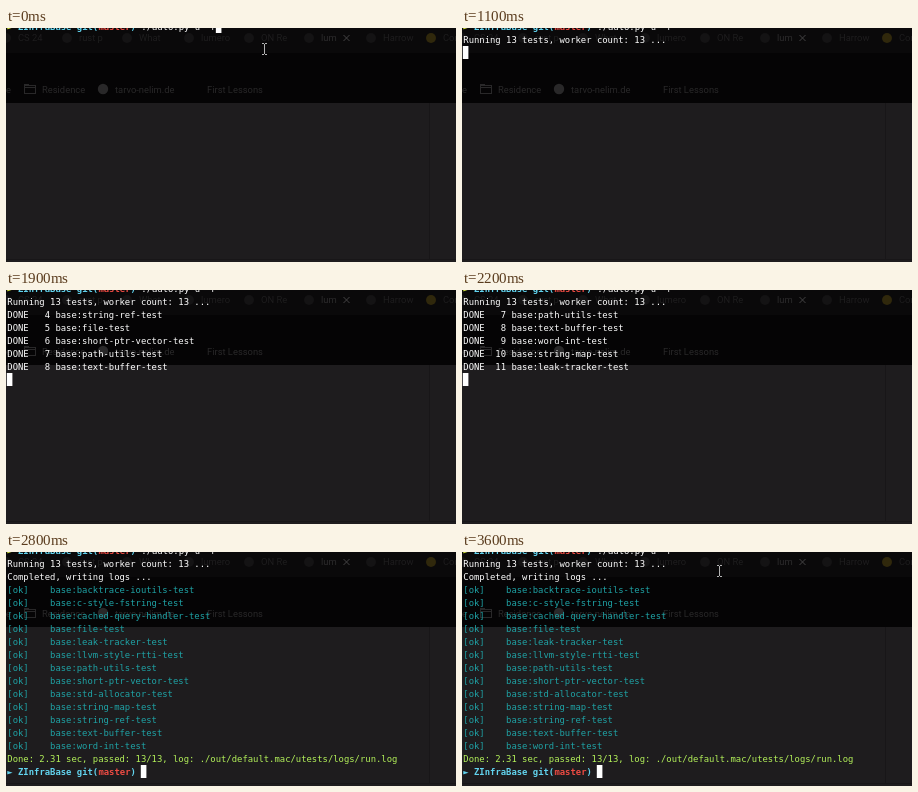
An HTML page with a canvas that plays this animation: 450x234 px, repeating every 3700 ms.

```html
<!DOCTYPE html>
<html lang="en">
<head>
<meta charset="utf-8">
<title>Terminal test run</title>
<style>
html, body { margin: 0; width: 100%; height: 100%; overflow: hidden; background: #1e1c1e; }
canvas { display: block; width: 450px; height: 234px; }
</style>
</head>
<body>
<canvas id="stage" width="450" height="234"></canvas>
<script>
const ctx = document.getElementById('stage').getContext('2d');
const LOOP = 3700, LEFT = 1.3, COL = 5.36, ROW = 12.95;
const WHITE = '#fff', TEAL = '#1fa3a6', LIME = '#b4f25a', CYAN = '#62d3ee', RED = '#ee4b43';

const tests = ['llvm-style-rtti', 'c-style-fstring', 'cached-query-handler', 'string-ref',
  'file', 'short-ptr-vector', 'path-utils', 'text-buffer', 'word-int', 'string-map',
  'leak-tracker', 'std-allocator', 'backtrace-ioutils'].map(name => `base:${name}-test`);
const sorted = [...tests].sort();

// [time in ms, number of finished tests]
const progress = [[1400, 2], [1500, 3], [1600, 4], [1700, 5], [1800, 6],
  [1900, 8], [2200, 11], [2400, 12], [2500, 13]];
const ENTER = 100, START = 400, FINISH = 2800, POINTER_BACK = 3400;

function rect(x, y, w, h, color) {
  ctx.fillStyle = color;
  ctx.fillRect(x, y, w, h);
}

function dot(x, y, r, color) {
  ctx.fillStyle = color;
  ctx.beginPath();
  ctx.arc(x, y, r, 0, Math.PI * 2);
  ctx.fill();
}

function label(text, x, y, color) {
  ctx.font = '9.4px Roboto, sans-serif';
  ctx.fillStyle = color;
  ctx.fillText(text, x, y);
}

function print(row, col, text, color = WHITE, weight = 'normal') {
  ctx.font = `${weight} 8.9px "DejaVu Sans Mono", monospace`;
  ctx.fillStyle = color;
  ctx.fillText(text, LEFT + col * COL, 2.4 + row * ROW);
}

function caret(row, col) {
  rect(0.8 + col * COL, Math.round(-7.6 + row * ROW), 5.6, 13, WHITE);
}

function prompt(row, arrow) {
  print(row, 0, '►', arrow, 'bold');
  print(row, 2, 'ZInfraBase git(', CYAN, 'bold');
  print(row, 17, 'master', RED, 'bold');
  print(row, 23, ')', CYAN, 'bold');
}

function drawBrowser() {
  rect(0, 0, 450, 234, '#1e1c1e');
  rect(0, 0, 450, 25, '#0a090a');
  rect(0, 25, 450, 50, '#050405');
  rect(423, 75, 1, 156, '#181618');
  rect(0, 231, 450, 1, '#181618');

  const tabs = [[12, 'CS 24'], [73, 'rust p'], [133, 'What'], [195, 'lumero'],
    [255, 'ON Re'], [315, 'lum'], [377, 'Harrow'], [437, 'Cor']];
  tabs.forEach(([x, title], i) => {
    dot(x - 12, 10, 5, i === 7 ? '#30280c' : '#141314');
    label(title, x, 13, i === 5 ? '#2c2b2c' : '#1e1d1e');
  });
  ctx.lineWidth = 1;
  ctx.strokeStyle = '#444344';
  ctx.beginPath();
  ctx.moveTo(337.5, 7);
  ctx.lineTo(343.5, 13);
  ctx.moveTo(343.5, 7);
  ctx.lineTo(337.5, 13);
  ctx.stroke();

  const ink = '#292829';
  label('e', 0, 64.5, ink);
  ctx.strokeStyle = ink;
  ctx.strokeRect(18.5, 57.5, 11, 8);
  rect(18, 56, 5, 1, ink);
  rect(19, 59, 10, 1, ink);
  dot(97, 61, 5.2, ink);
  label('Residence', 36, 64.5, ink);
  label('tarvo-nelim.de', 109, 64.5, ink);
  label('First Lessons', 201, 64.5, ink);
}

function drawPointer(x, y) {
  const color = '#b4b4b4';
  rect(x, y + 1, 1, 10, color);
  for (const end of [y, y + 11]) {
    rect(x - 2, end, 2, 1, color);
    rect(x + 1, end, 2, 1, color);
  }
}

function drawResults() {
  print(2, 0, 'Completed, writing logs ...');
  sorted.forEach((name, i) => print(3 + i, 0, '[ok]    ' + name, TEAL));
  print(16, 0, 'Done: 2.31 sec, passed: 13/13, log: ./out/default.mac/utests/logs/run.log', LIME);
  prompt(17, CYAN);
  caret(17, 25);
}

function drawProgress(t) {
  const done = progress.reduce((count, [time, n]) => t >= time ? n : count, 0);
  const first = Math.max(0, done - 5);
  tests.slice(first, done).forEach((name, i) =>
    print(2 + i, 0, `DONE${String(first + i + 1).padStart(4)} ${name}`));
  caret(2 + done - first, 0);
}

function draw(t) {
  drawBrowser();
  prompt(0, '#c8d83a');
  print(0, 25, './auto.py u -r');
  if (t >= START) print(1, 0, 'Running 13 tests, worker count: 13 ...');

  if (t < ENTER) caret(0, 39);
  else if (t < START) caret(1, 0);
  else if (t < FINISH) drawProgress(t);
  else drawResults();

  if (t < ENTER) drawPointer(258, 15);
  if (t >= POINTER_BACK) drawPointer(257, 13);
}

const began = performance.now();
function frame() {
  draw((performance.now() - began) % LOOP);
  requestAnimationFrame(frame);
}
frame();
</script>
</body>
</html>
```
